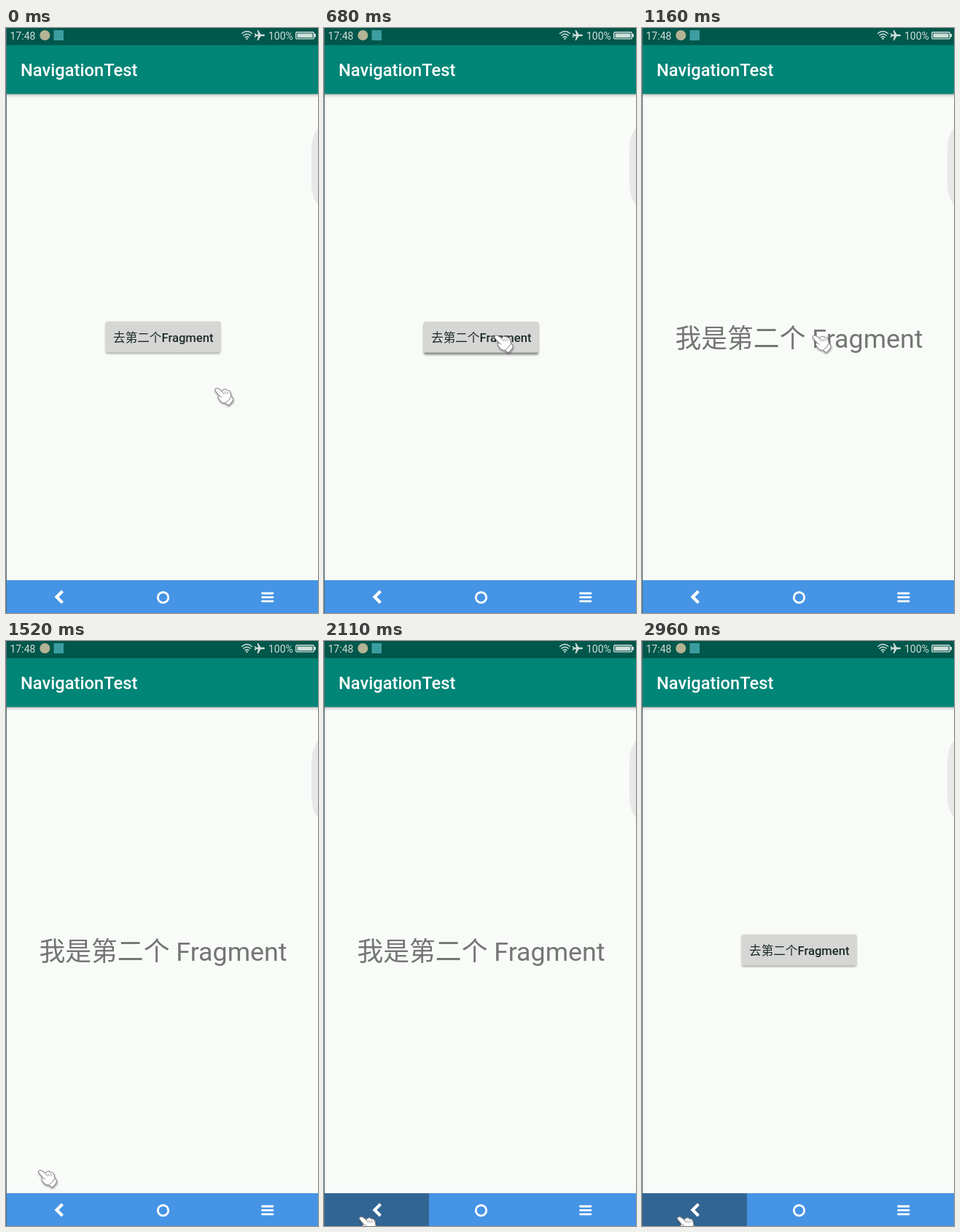
Write an HTML page that moves like this. It is 428 px wide and 803 px high and loops after 3.54 s.

```html
<!DOCTYPE html>
<html lang="zh-CN">
<head>
<meta charset="utf-8">
<title>NavigationTest</title>
<style>
  html, body { margin: 0; width: 100%; height: 100%; overflow: hidden; background: #f8fbf8; }
  svg { display: block; width: 100%; height: 100%; }
  text { font-family: Roboto, "Noto Sans CJK SC", "Noto Sans CJK", sans-serif; }
  .medium { font-weight: 500; }
  .line { fill: none; stroke-linecap: round; stroke-linejoin: round; }
</style>
</head>
<body>
<svg viewBox="0 0 428 803">
  <defs>
    <linearGradient id="shade" x2="0" y2="1">
      <stop stop-color="#000" stop-opacity=".34"/>
      <stop offset=".45" stop-color="#000" stop-opacity=".1"/>
      <stop offset="1" stop-color="#000" stop-opacity="0"/>
    </linearGradient>
    <filter id="blur" x="-20%" y="-50%" width="140%" height="200%"><feGaussianBlur stdDeviation="1.5"/></filter>
    <filter id="drop" x="-30%" y="-30%" width="170%" height="170%">
      <feDropShadow dx=".5" dy="1.5" stdDeviation="1" flood-opacity=".45"/>
    </filter>
  </defs>

  <rect width="428" height="803" fill="#f8fbf8"/>
  <path d="M428 137Q419 148 419 166V214Q419 232 428 243Z" fill="#e9e8e9"/>

  <!-- First screen -->
  <g id="first">
    <rect id="shadow" x="137" y="403" width="157" height="43" rx="2" filter="url(#blur)"/>
    <rect x="137" y="403" width="157" height="42.5" rx="2" fill="#d6d7d5"/>
    <text x="215.8" y="430.7" font-size="16.6" text-anchor="middle" fill="#1d2b28">去第二个<tspan class="medium">Fragment</tspan></text>
  </g>

  <!-- Second screen -->
  <text id="second" x="215.5" y="438.5" font-size="35.8" text-anchor="middle" fill="#747674">我是第二个 Fragment</text>

  <!-- App bar and status bar -->
  <rect y="90" width="428" height="6" fill="url(#shade)"/>
  <rect width="428" height="90.5" fill="#008577"/>
  <rect width="428" height="23.5" fill="#00574b"/>
  <text class="medium" x="20" y="66.3" font-size="23.7" fill="#fff">NavigationTest</text>
  <g fill="#cfdfdb" font-size="14">
    <text x="5.5" y="15.5">17:48</text>
    <text x="360" y="15.5">100%</text>
    <circle cx="53.3" cy="10" r="7" fill="#b5b395"/>
    <rect x="65.5" y="3" width="13.5" height="14" fill="#3b9da0"/>
    <g class="line" stroke="#cfdfdb" stroke-width="1.4">
      <path d="M323.5 7.5Q330.5 1.5 337.5 7.5M325.8 10.3Q330.5 6.2 335.2 10.3M328 12.8Q330.5 10.8 333 12.8"/>
      <rect x="397.7" y="5.7" width="24.6" height="9.2" rx="1.5"/>
    </g>
    <circle cx="330.5" cy="14.8" r="1.2"/>
    <path d="M355 10Q355 8.8 353.5 8.8H349.5L346 3H344.5L346 8.8H343L341.8 7H340.8L341.6 10L340.8 13H341.8L343 11.2H346L344.5 17H346L349.5 11.2H353.5Q355 11.2 355 10Z"/>
    <path d="M399.5 7.4H420.5V13.2H399.5ZM423 8H425V12.6H423Z"/>
  </g>

  <!-- Navigation bar -->
  <rect y="758" width="428" height="45" fill="#4594e5"/>
  <rect id="pressed" y="758" width="144" height="45" fill="#316594"/>
  <g class="line" stroke="#fff">
    <path d="M76 774.5L69.5 781L76 787.5" stroke-width="4.2" style="stroke-linecap:square;stroke-linejoin:miter"/>
    <circle cx="215.5" cy="781.7" r="7.2" stroke-width="2.8"/>
    <path d="M351.5 776H366M351.5 781.4H366M351.5 786.8H366" stroke-width="2.8"/>
  </g>
  <path d="M.5 0V803" stroke="#50707c"/>

  <g id="hand" filter="url(#drop)">
    <path d="M.8 3.8C-.2.8 3.2-.4 5.8 1.4L10.2 4.6C11.4 1.6 14.8 1 16.8 3C20 3 22 5.2 22.4 8.6L22.8 11.4L25.6 14.4Q26 17 23.6 19.8Q21.4 23 18.6 24L15 20.8C10.8 20.8 7.6 18.6 6.2 15.4C4.4 13.8 4.6 11.4 6.4 10.6Z"
      fill="#fdfdfd" stroke="#8b8b8b" stroke-width="1.1" stroke-linejoin="round"/>
    <path class="line" d="M10.2 4.8L13 8.6M13.6 5.6L16 8.4M17 5.2L18.8 7.8M6.6 10.6L9.8 12.6M22.4 12.2Q20.6 17.4 15.4 20.2" stroke="#8b8b8b"/>
  </g>
</svg>
<script>
const LOOP = 3540;
const [first, second, shadow, pressed, hand] =
  ["first", "second", "shadow", "pressed", "hand"].map(id => document.getElementById(id));

// Pointer stops: time, x, y
const stops = [
  [160, 286, 494], [450, 233.5, 421.5], [1165, 233.5, 421.5], [1520, 44, 726],
  [1660, 41, 792], [1690, 44, 793], [1850, 44, 793], [2100, 48, 790]
];

const progress = (t, from, to) => Math.min(1, Math.max(0, (t - from) / (to - from)));
const ease = p => (1 - Math.cos(Math.PI * p)) / 2;
const mix = (a, b, p) => a + (b - a) * p;

function pointerAt(t) {
  const next = stops.findIndex(s => s[0] > t);
  if (next === 0) return stops[0].slice(1);
  if (next < 0) return stops[stops.length - 1].slice(1);
  const [t0, x0, y0] = stops[next - 1], [t1, x1, y1] = stops[next];
  const p = ease(progress(t, t0, t1));
  return [mix(x0, x1, p), mix(y0, y1, p)];
}

function draw(now) {
  const t = now % LOOP;
  const shown = ease(progress(t, 730, 1140)) - ease(progress(t, 2360, 2780));
  const lift = progress(t, 610, 680) - progress(t, 1140, 1200);

  second.setAttribute("opacity", shown);
  first.setAttribute("opacity", 1 - shown);
  shadow.setAttribute("y", mix(404, 405.5, lift));
  shadow.setAttribute("opacity", mix(.36, .46, lift));
  pressed.setAttribute("opacity", t >= 1645 ? 1 : 0);
  hand.setAttribute("transform", `translate(${pointerAt(t)})`);
  requestAnimationFrame(draw);
}
draw(0);
</script>
</body>
</html>
```
